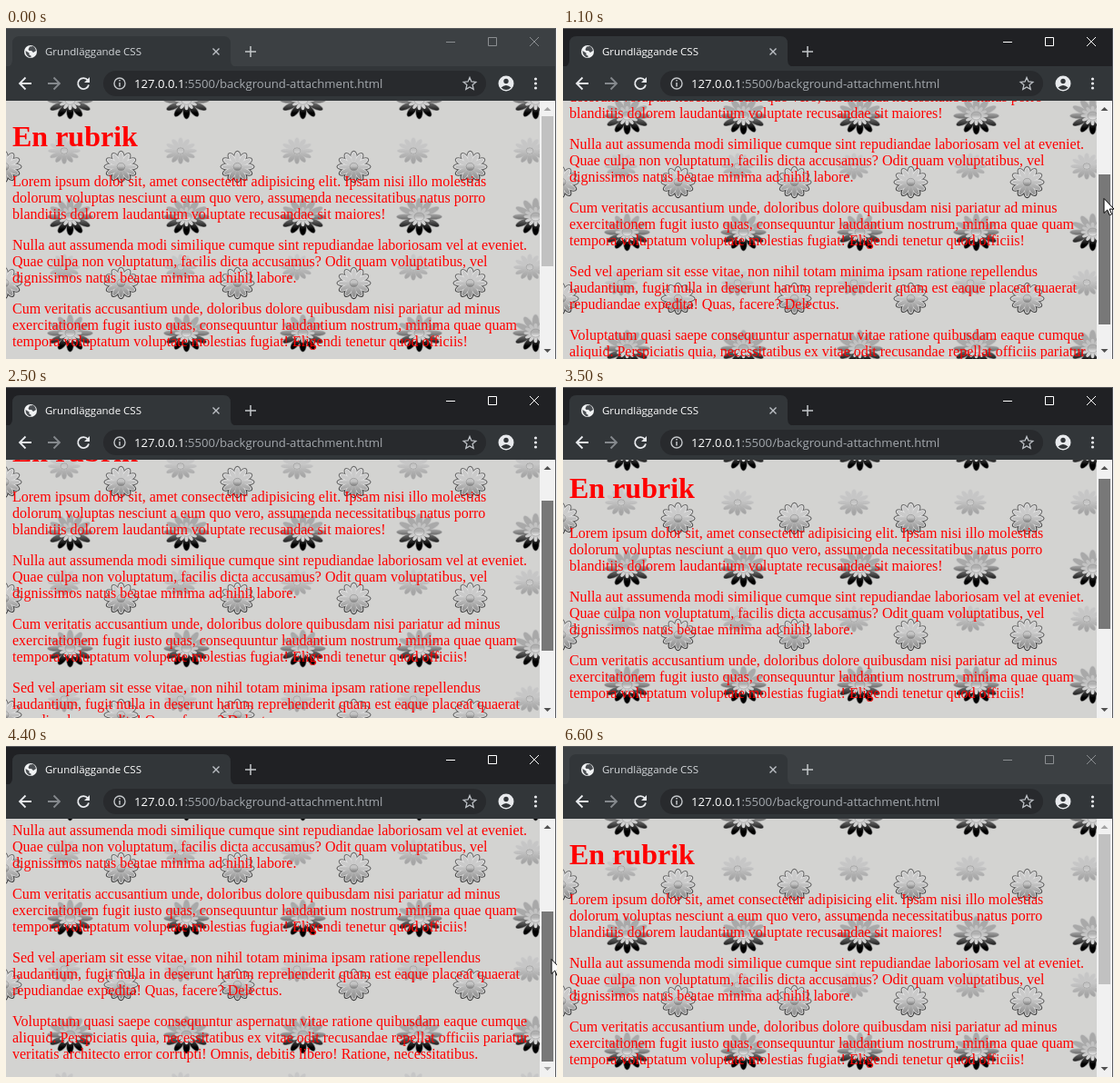
These frames come from a looping animation (606x364 px, 6700 ms). An HTML page with a canvas:

```html
<!DOCTYPE html>
<html lang="sv">
<head>
<meta charset="utf-8">
<title>Grundläggande CSS</title>
<style>
html, body { margin: 0; width: 606px; height: 364px; overflow: hidden; background: #fff; }
#view { position: absolute; left: 0; top: 80px; width: 587px; height: 284px; overflow: hidden; background: #d3d3d1; }
#page { position: absolute; left: 0; top: 0; width: 587px; height: 430px; }
#page canvas { position: absolute; left: 0; top: 0; }
#text { position: absolute; left: 7px; top: 0; color: #f00; white-space: pre; font: 16px/18px "Liberation Serif", "Times New Roman", serif; }
h1 { position: absolute; top: 21px; margin: 0; font-size: 32px; line-height: 37px; }
p { position: absolute; margin: 0; }
svg { position: absolute; left: 0; top: 0; font-family: "Open Sans", sans-serif; }
.line { fill: none; stroke: #e8eaed; stroke-width: 1.8; }
</style>
</head>
<body>
<div id="view"><div id="page">
<canvas id="paper" width="587" height="430"></canvas>
<div id="text"><h1>En rubrik</h1></div>
</div></div>

<svg width="606" height="364">
  <!-- title bar and tab -->
  <rect id="frame" width="605" height="43"/>
  <rect width="605" height="1" fill="#5a5c5e"/>
  <rect y="42" width="605" height="38" fill="#323639"/>
  <path d="M-1 43q8 0 8-8V17q0-8 8-8H239q8 0 8 8V35q0 8 8 8z" fill="#323639"/>
  <circle cx="27" cy="26" r="7" fill="#f1f3f4"/>
  <path d="M21.5 25l4 2.5v2l2 1v2q-6-1-6-7.500zM26 20.500l4-.5q3 2 3 5l-3 2-2-2h-2.500l-1-1.500z" fill="#4a4e52"/>
  <text id="title" x="43" y="30" font-size="11.5">Grundläggande CSS</text>
  <path class="line" style="stroke:#bdc1c6;stroke-width:1.4" d="M227.500 22.500l7 7m0-7l-7 7"/>
  <path class="line" style="stroke:#c4c7ca;stroke-width:1.5" d="M263 26h12m-6-6v12"/>
  <path id="buttons" fill="none" d="M484 15.500h10M530.500 10.500h9v9h-9zM576 10l10 10m0-10l-10 10"/>

  <!-- toolbar -->
  <rect x="107" y="47" width="421" height="28" rx="14" fill="#282a2d"/>
  <path class="line" d="M28 61H15m6.500-6.500L15 61l6.500 6.500"/>
  <path class="line" style="stroke:#85898d" d="M46 61h13m-6.500-6.500L59 61l-6.500 6.500"/>
  <path class="line" d="M90 57.500a6 6 0 1 0 1 5"/>
  <path d="M92 54v6h-6z" fill="#e8eaed"/>
  <circle class="line" style="stroke:#c4c7ca;stroke-width:1.400" cx="125" cy="61" r="6"/>
  <path class="line" style="stroke:#c4c7ca;stroke-width:1.500" d="M125 60v4.500m0-7.500v1.600"/>
  <text x="141" y="66" font-size="13.15" fill="#a4a9ae"><tspan fill="#fff">127.0.0.1</tspan>:5500/background-attachment.html</text>
  <path class="line" style="stroke:#bdc1c6;stroke-width:1.300" d="M510 54.500l1.900 4.500 4.900.4-3.700 3.200 1.100 4.800-4.200-2.500-4.200 2.500 1.100-4.800-3.700-3.200 4.900-.4z"/>
  <circle cx="550" cy="61" r="8.500" fill="#e8eaed"/>
  <circle cx="550" cy="58.500" r="2.700" fill="#323639"/>
  <path d="M544.500 65.500q5.500-5 11 0q-5.500 5-11 0" fill="#323639"/>
  <g fill="#e8eaed"><circle cx="582.500" cy="56" r="1.600"/><circle cx="582.500" cy="61" r="1.600"/><circle cx="582.500" cy="66" r="1.600"/></g>

  <!-- scrollbar -->
  <rect x="587" y="80" width="17" height="284" fill="#f1f1f1"/>
  <path id="up" d="M591.500 91h8l-4-4z"/>
  <path id="down" d="M591.500 353h8l-4 4z"/>
  <rect id="thumb" x="589" width="13" height="165"/>
  <rect x="604" width="1" height="364" fill="#55575a"/>
  <path id="cursor" d="M.5.500v16l3.700-3.500 2.500 5.800 2.400-1-2.500-5.700h5z" fill="#fff" stroke="#000"/>
</svg>

<script>
const $ = id => document.getElementById(id);
const LOOP = 6700, MAX = 146, RATIO = 165 / 284, GRAB = 122;

const paragraphs = [
`Lorem ipsum dolor sit, amet consectetur adipisicing elit. Ipsam nisi illo molestias
dolorum voluptas nesciunt a eum quo vero, assumenda necessitatibus natus porro
blanditiis dolorem laudantium voluptate recusandae sit maiores!`,
`Nulla aut assumenda modi similique cumque sint repudiandae laboriosam vel at eveniet.
Quae culpa non voluptatum, facilis dicta accusamus? Odit quam voluptatibus, vel
dignissimos natus beatae minima ad nihil labore.`,
`Cum veritatis accusantium unde, doloribus dolore quibusdam nisi pariatur ad minus
exercitationem fugit iusto quas, consequuntur laudantium nostrum, minima quae quam
tempora voluptatum voluptate molestias fugiat! Eligendi tenetur quod officiis!`,
`Sed vel aperiam sit esse vitae, non nihil totam minima ipsam ratione repellendus
laudantium, fugit nulla in deserunt harum reprehenderit quam est eaque placeat quaerat
repudiandae expedita! Quas, facere? Delectus.`,
`Voluptatum quasi saepe consequuntur aspernatur vitae ratione quibusdam eaque cumque
aliquid. Perspiciatis quia, necessitatibus ex vitae odit recusandae repellat officiis pariatur
veritatis architecto error corrupti! Omnis, debitis libero! Ratione, necessitatibus.`];
paragraphs.forEach((words, i) => {
  const p = document.createElement('p');
  p.textContent = words;
  p.style.top = 80 + i * 70 + 'px';
  $('text').append(p);
});

// Wallpaper: three flowers on a 128 px tile.
// Petal layers: [inner radius, outer radius, half width, top colour, bottom colour]
const flowers = [
  { x: 70.5, y: -.5, squash: .82, core: [5.500, '#b0b0b0', '#dedede'], petals: [
    [5, 25.500, 4.300, '#c4c4c4', '#777'],
    [5, 24.800, 3.500, '#a9a9a9', '#000'],
    [4, 13, 2, '#c2c2c2', '#d4d4d4']] },
  { x: 64, y: 55, squash: .82, core: [4, '#c4c4c4', '#d0d0d0'], petals: [
    [4, 18, 3.200, '#cdcdcd', '#bdbdbd'],
    [4, 17.500, 2.500, '#c6c6c6', '#a6a6a6']] },
  { x: 126.500, y: 72.500, squash: .93, core: [4.500, '#c4c4c4', '#8c8c8c'], petals: [
    [3, 19, 4.300, '#6c6c6c', '#3c3c3c'],
    [4, 17.800, 3.200, '#e8e8e8', '#d8d8d8'],
    [4, 16.800, 2.400, '#cacaca', '#989898']] }
];
const ctx = $('paper').getContext('2d');

function shade(r, top, bottom) {
  const g = ctx.createLinearGradient(0, -r, 0, r);
  g.addColorStop(.42, top);
  g.addColorStop(.85, bottom);
  return g;
}
function drawFlower({ x, y, squash, core: [r, top, bottom], petals }, dx, dy) {
  ctx.save();
  ctx.translate(x + dx, y + dy);
  ctx.scale(1, squash);
  for (const [near, far, half, a, b] of petals) {
    ctx.fillStyle = shade(far, a, b);
    for (let i = 0; i < 12; i++) {
      const turn = i * Math.PI / 6, mid = (near + far) / 2;
      ctx.beginPath();
      ctx.ellipse(mid * Math.cos(turn), mid * Math.sin(turn), (far - near) / 2, half, turn, 0, 7);
      ctx.fill();
    }
  }
  ctx.beginPath();
  ctx.arc(0, 0, r, 0, 7);
  ctx.fillStyle = shade(r, top, bottom);
  ctx.fill();
  ctx.strokeStyle = '#8888';
  ctx.stroke();
  ctx.restore();
}
for (let dx = -128; dx < 587; dx += 128)
  for (let dy = 0; dy < 512; dy += 128)
    flowers.forEach(f => drawFlower(f, dx, dy));

// Pointer path as [time, value]; dragging the thumb follows its height.
const pathY = [[100, 122], [600, 149], [1100, 186.600], [1400, 238], [1600, 241], [1800, 241],
  [2500, 150], [2800, 121], [3400, 121], [3500, 126.700], [4100, 209], [4400, 234],
  [4600, 234], [5400, 136.600], [5800, 121]];
const pathX = [[0, 607], [100, 597], [1100, 594.500], [1600, 593.500], [1800, 593.500], [2400, 607],
  [3500, 607], [4200, 599.500], [4600, 599.500], [5400, 604], [5500, 608]];

function at(path, t) {
  const i = path.findIndex(k => k[0] >= t);
  if (i < 0) return path[path.length - 1][1];
  if (!i) return path[0][1];
  const [t0, a] = path[i - 1], [t1, b] = path[i];
  return a + (b - a) * (t - t0) / (t1 - t0);
}
const fill = (id, colour) => $(id).setAttribute('fill', colour);

function draw(now) {
  const t = Math.floor(now % LOOP / 100) * 100;
  const active = t >= 100 && t < 6600;
  const y = at(pathY, t);
  const scroll = Math.round(Math.max(0, Math.min(MAX, (y - GRAB) / RATIO)));

  $('page').style.top = -scroll + 'px';
  $('thumb').setAttribute('y', Math.floor(97 + scroll * RATIO + .2));
  $('cursor').setAttribute('transform', `translate(${at(pathX, t)} ${Math.round(y)})`);
  fill('frame', active ? '#202124' : '#3c4043');
  fill('title', active ? '#fff' : '#d5d8db');
  $('buttons').setAttribute('stroke', active ? '#fff' : '#8b8e91');
  fill('thumb', active && t < 6000 ? '#787878' : '#c1c1c1');
  fill('up', scroll ? '#505050' : '#a3a3a3');
  fill('down', scroll < MAX ? '#505050' : '#a3a3a3');
  requestAnimationFrame(() => draw(performance.now()));
}
draw(0);
</script>
</body>
</html>
```
